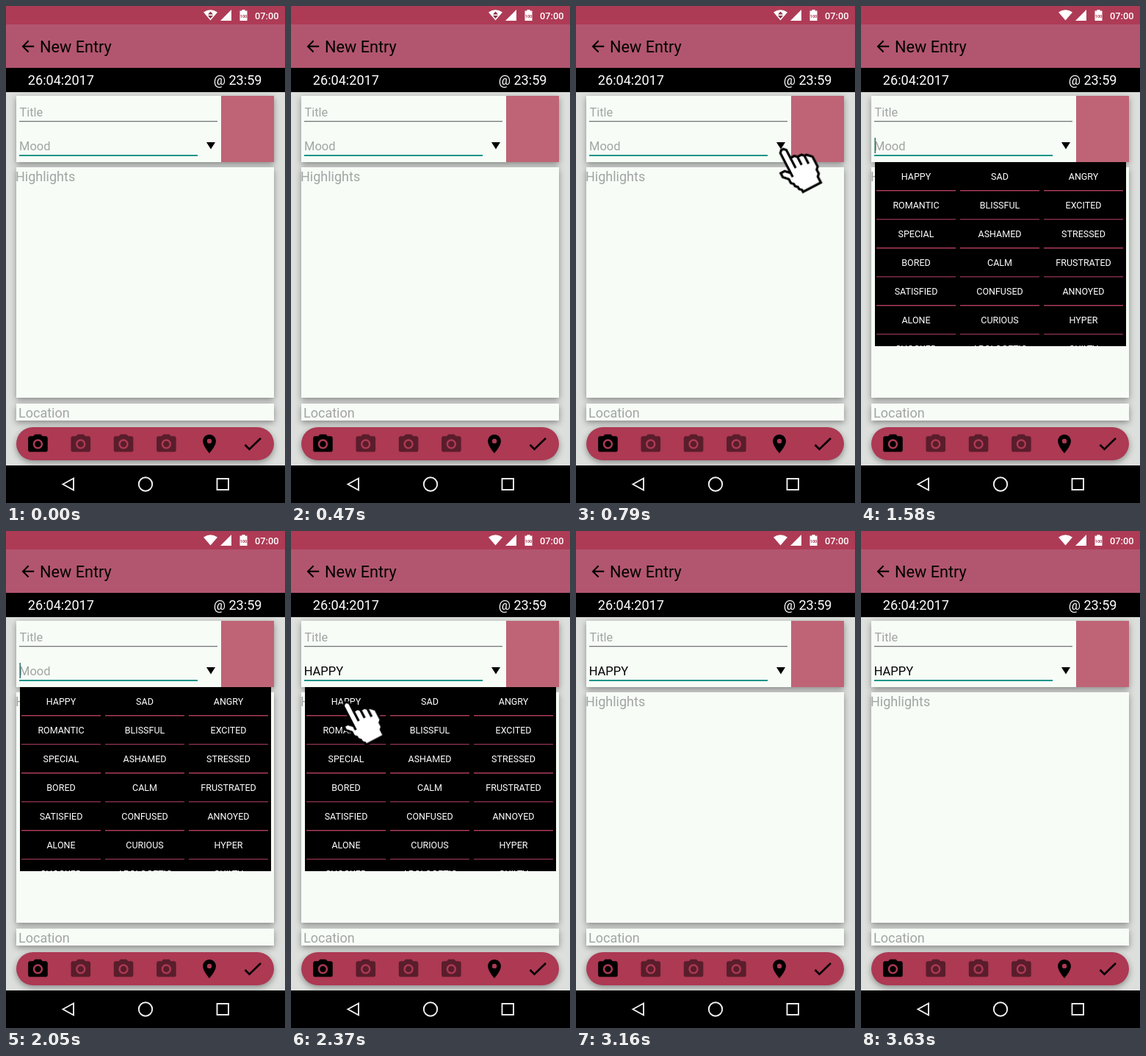
An HTML page that plays this animation: 380 by 675 pixels, repeating every 3950 ms.

```html
<!DOCTYPE html>
<html lang="en">
<head>
<meta charset="utf-8">
<title>New Entry</title>
<style>
  html, body { margin: 0; width: 100%; height: 100%; overflow: hidden; background: #dcdfdc; }
  svg { display: block; width: 380px; height: 675px; font-family: Roboto, sans-serif; }
  .card { filter: drop-shadow(0 3px 4px rgba(0, 0, 0, .38)); }
  .paper { fill: #f7fcf7; }
  .hint { fill: #a2a5a2; }
  .cell { fill: #fff; font-size: 12.5px; text-anchor: middle; }

  .net, .mood, .picked, .caret, .list, .hand { animation: 3950ms step-end infinite; }
  .net { animation-name: net; }
  .mood { animation-name: mood; }
  .picked { animation-name: picked; }
  .caret { animation-name: caret; }
  .list { animation-name: list; }
  .hand { animation-name: hand; }

  @keyframes net { 0% { opacity: 1; } 40%, 100% { opacity: 0; } }
  @keyframes mood { 0% { opacity: 1; } 60%, 100% { opacity: 0; } }
  @keyframes picked { 0% { opacity: 0; } 60%, 100% { opacity: 1; } }
  @keyframes caret { 0% { opacity: 0; } 40% { opacity: 1; } 60%, 100% { opacity: 0; } }
  @keyframes list { 0% { opacity: 0; } 40% { opacity: 1; } 80%, 100% { opacity: 0; } }
  @keyframes hand {
    0% { opacity: 0; transform: translate(281px, 195px); }
    20% { opacity: 1; transform: translate(281px, 195px); }
    40% { opacity: 0; transform: translate(74px, 233px); }
    60% { opacity: 1; transform: translate(74px, 233px); }
    80%, 100% { opacity: 0; transform: translate(74px, 233px); }
  }
</style>
</head>
<body>
<svg viewBox="0 0 380 675" xmlns="http://www.w3.org/2000/svg">
  <defs>
    <g id="camera">
      <path d="M9 2L7.17 4H4c-1.1 0-2 .9-2 2v12c0 1.1.9 2 2 2h16c1.1 0 2-.9 2-2V6c0-1.1-.9-2-2-2h-3.17L15 2H9zm3 15c-2.76 0-5-2.24-5-5s2.24-5 5-5 5 2.24 5 5-2.24 5-5 5z"/>
      <circle cx="12" cy="12" r="3.2"/>
    </g>
    <clipPath id="listBox"><rect x="19" y="212" width="342" height="250"/></clipPath>
  </defs>

  <rect width="380" height="675" fill="#dcdfdc"/>

  <!-- cards -->
  <g class="card">
    <rect class="paper" x="14" y="122" width="279" height="90"/>
    <rect x="293" y="122" width="72" height="90" fill="#bf6476"/>
  </g>
  <rect class="card paper" x="14" y="219" width="351" height="313"/>
  <rect class="card paper" x="14" y="540" width="351" height="23"/>
  <rect class="card" x="14" y="572" width="351" height="45" rx="22.5" fill="#ad3953"/>

  <!-- form -->
  <g class="hint">
    <text x="18.5" y="150" font-size="16.3">Title</text>
    <text class="mood" x="18" y="195.5" font-size="16.5">Mood</text>
    <text x="13" y="237.5" font-size="18">Highlights</text>
    <text x="17" y="558.5" font-size="18">Location</text>
  </g>
  <text class="picked" x="17.7" y="195.5" font-size="16.5">HAPPY</text>
  <rect x="18" y="156" width="270" height="1.3" fill="#777"/>
  <rect x="18" y="202" width="243" height="2" fill="#159588"/>
  <rect class="caret" x="18.5" y="179" width="1.5" height="21" fill="#2b6f69"/>
  <path d="M273 185h12l-6 9.5z"/>

  <!-- bars -->
  <rect width="380" height="25.5" fill="#ae3b56"/>
  <rect y="25" width="380" height="59.5" fill="#b2566f"/>
  <rect y="84" width="380" height="33" />
  <rect y="624" width="380" height="51"/>
  <path transform="translate(17.4 42.4) scale(1.04)" d="M20 11H7.83l5.59-5.59L12 4l-8 8 8 8 1.41-1.41L7.83 13H20v-2z"/>
  <text x="46" y="63" font-size="21.7">New Entry</text>
  <g fill="#fff">
    <text x="29.8" y="107" font-size="18.1">26:04:2017</text>
    <text x="282.7" y="107" font-size="18.1">@ 23:59</text>
    <text x="339" y="17.5" font-size="12.8" font-weight="500">07:00</text>
    <path d="M278.5 19.5L269 8.6Q278.5 2 288 8.6z"/>
    <path d="M292 20h15V5z"/>
    <path d="M318.5 6.5h3V5h4v1.500h3V20h-10z"/>
  </g>
  <text x="323.5" y="15.500" font-size="5.5" font-weight="700" text-anchor="middle" fill="#ae3b56">100</text>
  <path class="net" d="M275 11.500h7l-3.500-4zM275 13h7l-3.500 4z" fill="#8a3347"/>

  <!-- actions -->
  <g id="cameras"></g>
  <path transform="translate(261.800 579.500) scale(1.27)" d="M12 2C8.130 2 5 5.130 5 9c0 5.250 7 13 7 13s7-7.750 7-13c0-3.870-3.130-7-7-7zm0 9.500a2.500 2.500 0 0 1 0-5 2.500 2.500 0 0 1 0 5z"/>
  <path d="M325.500 596l6 6L347 587" fill="none" stroke="#000" stroke-width="2.600"/>
  <g fill="none" stroke="#f2f2f2" stroke-width="1.900">
    <path d="M77.500 649.500L92 641.500v16z"/>
    <circle cx="190" cy="649.500" r="9.200"/>
    <rect x="287.500" y="642" width="15.500" height="15"/>
  </g>

  <g class="list" clip-path="url(#listBox)">
    <rect x="19" y="212" width="342" height="250"/>
    <g id="moods"></g>
  </g>

  <g class="hand">
    <g transform="rotate(-27.5) scale(3.05) translate(-5.5 0)" fill="#fff" stroke="#000" stroke-width="1.05">
      <path d="M4 13V1L5 0H6L7 1V5H9L10 6H12L13 7H14L16 9V14L15 15V17L14 18V21H5V20L4 19V18L3 17V16L2 15V13L0 11V9H2L4 11"/>
      <path d="M7 5V10M10 6V10M13 7V11" fill="none"/>
    </g>
  </g>
</svg>
<script>
  const moods = [
    "HAPPY", "SAD", "ANGRY", "ROMANTIC", "BLISSFUL", "EXCITED",
    "SPECIAL", "ASHAMED", "STRESSED", "BORED", "CALM", "FRUSTRATED",
    "SATISFIED", "CONFUSED", "ANNOYED", "ALONE", "CURIOUS", "HYPER",
    "SHOCKED", "APOLOGETIC", "GUILTY"
  ];

  function add(parent, tag, attrs, text = "") {
    const el = document.createElementNS("http://www.w3.org/2000/svg", tag);
    for (const key in attrs) el.setAttribute(key, attrs[key]);
    el.textContent = text;
    document.getElementById(parent).append(el);
  }

  moods.forEach((name, i) => {
    const row = Math.floor(i / 3);
    const x = 75 + 114 * (i % 3);
    const y = 236.3 + 39 * row;
    add("moods", "text", { class: "cell", x, y }, name);
    add("moods", "rect", {
      x: x - 54, y: y + 13.7, width: 108, height: 1.4,
      fill: row % 2 ? "#85304a" : "#b43f5e"
    });
  });

  for (let i = 0; i < 4; i++) {
    add("cameras", "use", {
      href: "#camera",
      transform: `translate(${27.5 + 58.3 * i} 579) scale(1.33)`,
      fill: i ? "#591d2b" : "#000"
    });
  }
</script>
</body>
</html>
```
